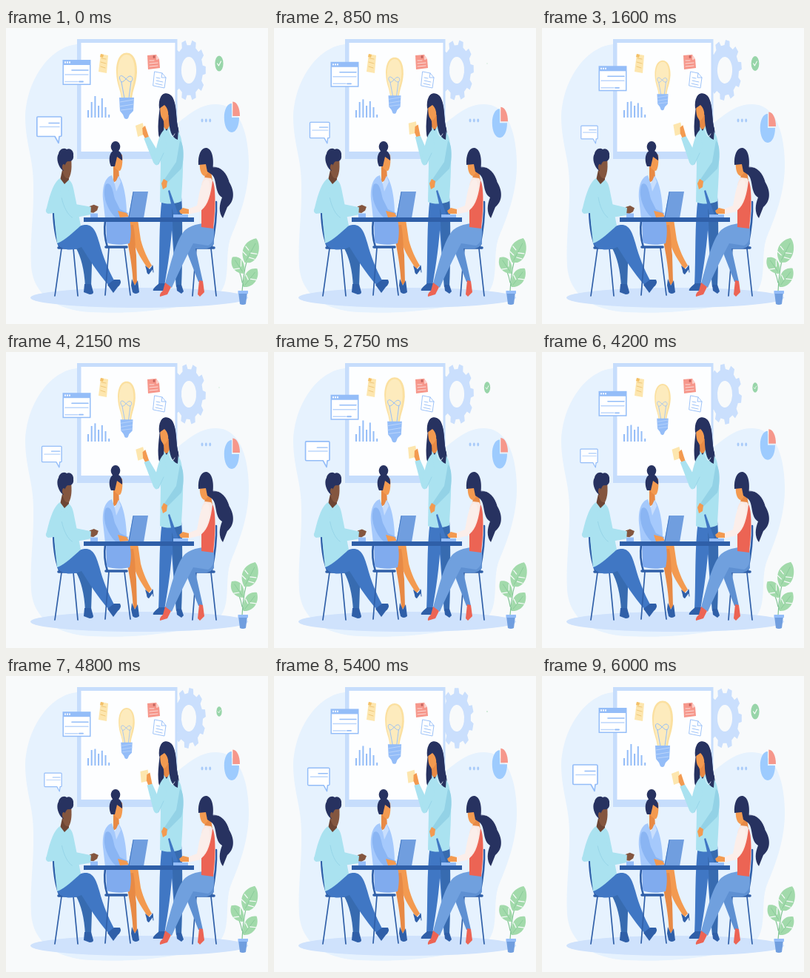
Animation of 354x400 px, one loop 6100 ms. Source, as an HTML page with a canvas:

```html
<!DOCTYPE html>
<html lang="en">
<head>
<meta charset="utf-8">
<title>Team meeting</title>
<style>
html, body { margin: 0; width: 100%; height: 100%; overflow: hidden; background: #f8fafb; }
canvas { display: block; width: 354px; height: 400px; }
</style>
</head>
<body>
<canvas id="stage" width="354" height="400"></canvas>
<script>
const ctx = document.getElementById('stage').getContext('2d');
const LOOP = 6100, STEP = 50;
const C = {
  bg: '#f8fafb', blob: '#e6f2fe', floor: '#cfe2fc', frame: '#c6ddfc', white: '#fdfeff',
  gear: '#cadffd', sky: '#bcd6fb', mid: '#94bdf8', blue: '#709edf', denim: '#4077c4',
  deep: '#2f5fa8', shade: '#376bb0', navy: '#273260', skin: '#f39a50', skinDark: '#e88a45',
  brown: '#84563f', mint: '#aae2f0', mintDark: '#93d2e6', dress: '#a5c9fc', dressDark: '#8ab5f3',
  skirt: '#80abee', jeans: '#70a0de', red: '#ec6454', salmon: '#f6978b', pie: '#9dcbfe',
  green: '#a2daab', leafDark: '#80c493', glass: '#fdebbd', note: '#fde6ae'
};

// Eased pulse: 0 at the start of each period, 1 halfway
const pulse = (t, period) => (1 - Math.cos(2 * Math.PI * t / period)) / 2;

function fill(d, color) {
  ctx.fillStyle = color;
  ctx.fill(new Path2D(d));
}
function line(d, color, width) {
  ctx.strokeStyle = color;
  ctx.lineWidth = width;
  ctx.stroke(new Path2D(d));
}
function rect(x, y, w, h, color) {
  ctx.fillStyle = color;
  ctx.fillRect(x, y, w, h);
}
function oval(x, y, rx, ry, color) {
  ctx.fillStyle = color;
  ctx.beginPath();
  ctx.ellipse(x, y, rx, ry, 0, 0, 7);
  ctx.fill();
}
function pose(x, y, { dy = 0, scale = 1, angle = 0 }, draw) {
  ctx.save();
  ctx.translate(x, y + dy);
  ctx.rotate(angle);
  ctx.scale(scale, scale);
  ctx.translate(-x, -y);
  draw();
  ctx.restore();
}

function backdrop() {
  rect(0, 0, 354, 400, C.bg);
  fill('M96 22C60 25 27 70 26 122C27 160 37 176 37 212C38 252 32 282 34 322C37 362 70 382 115 384C185 388 252 376 285 362C306 345 294 308 304 282C316 253 329 220 328 180C327 138 314 103 284 103C262 103 248 116 230 130L228 60Z', C.blob);
  oval(180, 364.5, 147, 13.5, C.floor);
}

function board() {
  rect(96, 15, 135.5, 162, C.frame);
  rect(101.5, 20, 127, 147, C.white);
}

function bars(t) {
  const tops = [111, 100, 92, 105, 95, 107, 117];
  const short = 1 - 0.25 * pulse(t, 3000);
  tops.forEach((top, i) => {
    const h = (121 - top) * (i === 2 || i === 4 ? short : 1);
    rect(110 + i * 4.7, 121 - h, 2, h, C.mid);
  });
}

function papers() {
  fill('M128 35L138 37L136 61L125 59Z', C.note);
  line('M129 41L135 42M128 46L135 48M128 52L134 54', '#eec373', 0.9);
  fill('M128 35L132 36L131 40L127 39Z', '#f3c069');
  fill('M191 37L203 36L207 42L208 54L192 56Z', C.salmon);
  fill('M203 36L207 42L203 43Z', '#fbd0ca');
  oval(200, 39, 1.5, 2, '#c4645f');
  line('M194 44H200M194 48L205 47M194 52L205 51', '#fde4e0', 0.9);
  fill('M201 59L211 61L216 67L214 81L199 78Z', '#fff');
  line('M201 59L211 61L216 67L214 81L199 78ZM211 61L210 67L216 67', C.mid, 0.9);
  line('M203 67L208 68M203 71L212 73M202 75L211 77', C.mid, 0.9);
}

function bulb(t) {
  pose(163, 75, { scale: 1 - 0.25 * pulse(t, 3000) }, () => {
    fill('M163 33.5C173 33.5 177.5 46 177 60C176 77 171 83 170 96H156C155 83 149.5 77 149 60C148.5 46 153 33.5 163 33.5Z', '#fbe0a0');
    fill('M163 36C171 36 174 47 174 59C173 76 169 82 168 96H157C156 83 151 76 151 60C151 47 155 36 163 36Z', C.glass);
    line('M160 95L156 73C151 67 154 61 160 67L166 72C171 75 173 66 168 65C163 65 161 73 156 73M166 95L169 72', C.mid, 1);
    fill('M153 94H173L172 112L167 117L165 122Q163 124 160 122L158 117L154 112Z', C.mid);
    line('M154 100L172 97M154 106L172 103M155 111L171 109', C.sky, 1);
  });
}

function gear(t) {
  ctx.save();
  ctx.translate(247, 57);
  ctx.scale(0.56, 1);
  ctx.rotate(pulse(t, 6000) * Math.PI);
  ctx.beginPath();
  for (let i = 0; i < 10; i++) {
    const a = i * Math.PI / 5;
    [[-0.19, 34], [-0.12, 41], [0.12, 41], [0.19, 34]].forEach(([o, r]) =>
      ctx.lineTo(r * Math.cos(a + o), r * Math.sin(a + o)));
  }
  ctx.closePath();
  ctx.moveTo(18, 0);
  ctx.arc(0, 0, 18, 0, 2 * Math.PI, true);
  ctx.fillStyle = C.gear;
  ctx.fill('evenodd');
  ctx.restore();
}

function browser(t) {
  pose(95, 60, { dy: 15 * pulse(t, 6000) }, () => {
    rect(76.5, 43, 38, 34, C.mid);
    rect(78, 50, 35, 25.5, '#fff');
    for (let i = 0; i < 3; i++) oval(80 + i * 3, 46.5, 0.9, 1.4, '#fff');
    line('M89 57H111', C.mid, 1.6);
    line('M80 63H111', C.sky, 1.6);
    line('M80 72.5H97', C.sky, 1.6);
    line('M99 72.5H104', C.mid, 1.8);
  });
}

function bubble(t) {
  pose(75.5, 157, { scale: 1 - 0.33 * pulse(t, 3000) }, () => {
    const d = 'M43 120H73.5Q75 120 75 121.5V145Q75 146.5 73.5 146.5H72L71 155.5L66 146.5H43Q41.8 146.5 41.8 145V121.5Q41.8 120 43 120Z';
    fill(d, '#fff');
    line(d, C.mid, 1.7);
    line('M58 128.5H72', C.mid, 1.5);
    line('M46 133.5H72', C.sky, 1.7);
  });
}

function badge(t) {
  pose(288, 48, { scale: Math.max(0.06, 1 - pulse(t, 1500)) }, () => {
    oval(288, 48, 5.6, 10.5, '#98d5a9');
    line('M285.5 48L287.4 51L290.5 45', '#fff', 1.1);
  });
}

function pie(t) {
  pose(305, 121, { dy: 19 * pulse(t + 600, 6000) - 1.8 }, () => {
    fill('M305 121V102C299 102 294.8 110 294.8 121C294.8 132 299 141 305 141C311 141 315 132 315 121Z', C.pie);
    fill('M306.3 119V99.5C312 99.5 316 108 316 119Z', C.salmon);
  });
  [265, 270.3, 275.7].forEach(x => oval(x, 125, 1.5, 2.4, '#a9cbf9'));
}

function chair(back, seat, legs) {
  line(back, C.deep, 2.6);
  line(seat, C.deep, 3.6);
  line(legs, C.deep, 1.7);
}

function man(t) {
  chair('M64 241C64 262 67 282 72 295', 'M71 297H98', 'M75 298L66 362M91 298L97 362');
  fill('M86 284C98 276 112 280 117 290L115 350H107C106 326 101 309 95 298Z', C.shade);
  fill('M69 291C82 283 92 268 106 266C118 265 122 276 126 290C131 309 138 326 146 341L139 348C123 330 112 312 102 296C91 301 76 302 69 291Z', C.denim);
  fill('M106 346L115 346L118 357Q118 360 113 360L105 357Z', C.deep);
  fill('M137 347L146 340L154 340Q157 345 151 350L145 358Z', C.deep);
  fill('M76 192L85 197L85 209L79 213L73 206Z', '#6d4534');
  fill('M76 176H88C89 185 89 196 85 203C80 205 77 198 76 190Z', C.brown);
  fill('M75 191C69 184 68 174 71 170C72 164 78 161 82 164C87 161 92 167 91 172C92 178 88 181 84 180C80 181 81 185 78 187L78 193Z', C.navy);
  oval(78, 188, 2, 4, C.brown);
  fill('M73 203C65 208 60 222 55 243Q52 249 57 251L65 250C66 266 68 280 69 291C80 287 92 275 101 267L94 231C91 217 91 210 85 205L79 211Z', C.mint);
  pose(92, 245, { angle: -0.05 + 0.06 * pulse(t, 1000) }, () => {
    fill('M113 242L119 240L125 243L123 248L118 251L112 250Z', C.brown);
    fill('M75 215C82 211 88 219 90 230L94 238L115 243L114 253L88 257C80 251 73 231 75 215Z', C.mint);
    line('M76 229C78 241 83 252 89 256', C.mintDark, 0.8);
  });
}

function seatedWoman() {
  chair('M134 261C132 274 134 286 137 296', 'M135 296H163', 'M139 297L134 361M160 297L168 361');
  fill('M162 259H178L182 286C186 301 191 311 197 321L192 326C184 313 176 303 172 287Z', C.skin);
  fill('M160 267L172 266C175 282 174 291 176 307L177 344L172 349C171 325 168 310 165 293Z', C.skinDark);
  line('M198 321L199 330', C.deep, 1);
  fill('M188 321L194 326L198 321L199 325L193 333Q190 332 190 328Z', C.deep);
  fill('M170 339L174 348L178 341L180 357Q175 361 171 357L169 348Z', C.deep);
  fill('M135 255H166C170 269 169 281 167 291C156 294 144 293 136 290Z', C.skirt);
  oval(148, 160.5, 6.3, 7.5, C.navy);
  fill('M145 184H152L153 204L145 209Z', C.skinDark);
  fill('M146 171H157C158 180 157 190 154 193C149 193 146 188 145 182Z', C.skin);
  fill('M142 187C137 176 141 165 148 165C154 165 158 171 157 179L150 174L147 187Z', C.navy);
  fill('M143 199C133 202 130 216 131 231L134 258H163C164 239 160 208 152 200L147 211Z', C.dress);
  fill('M145 201L147 211L152 200L155 208L149 221Z', '#c8defd');
  fill('M135 211C142 207 144 218 147 231L154 245L165 250L164 256H148C136 245 129 223 135 211Z', C.dressDark);
  fill('M151 247L163 250L166 255L154 256Z', C.skin);
  fill('M172 221H192L186 257H165Z', C.blue);
  line('M172 221.5L166 256', C.denim, 1);
}

function presenter(t) {
  fill('M211 228H237C239 264 238 314 237 350H230L224 273C222 302 217 331 214 349H206C208 308 206 266 211 228Z', C.denim);
  fill('M224 246L229 230H237C239 264 238 314 237 350H230Z', C.shade);
  fill('M207 345L215 345L221 347L212 355H199Q197 353 207 345Z', C.deep);
  fill('M230 347H237L240 356L237 359L231 355Z', C.deep);
  fill('M209 96C209 87 220 86 225 94C231 105 229 123 233 137C235 146 232 154 226 155L208 151C203 137 207 117 209 96Z', C.navy);
  fill('M213 117H222L224 135L211 138Z', C.skinDark);
  fill('M209 100H221C221 112 219 122 214 125C209 123 207 113 209 100Z', C.skin);
  fill('M212 132C205 139 208 165 209 184L208 235C217 239 230 238 237 234C238 211 242 166 236 147C233 138 226 131 221 132L217 139Z', C.mint);
  fill('M207 109C205 90 215 84 224 92C232 104 229 124 233 136L232 151C223 148 221 137 220 125C220 116 219 108 214 104Z', C.navy);
  fill('M210 121C205 129 205 142 208 150C213 147 214 136 213 126Z', C.navy);
  line('M220 137Q224 153 228 143', '#e8f4fb', 0.8);
  fill('M235 152C241 157 241 179 237 190L217 210L213 206L230 181Z', C.mintDark);
  fill('M213 204L218 207L217 215L212 218L210 210Z', C.skin);
  // Upper arm stays, forearm lifts the note
  pose(203, 182, { angle: -0.08 + 0.14 * pulse(t, 2000) }, () => {
    fill('M179 130L189 127L192 142L181 145Z', C.note);
    fill('M188 134L192 131L196 147L191 149L188 142Z', C.skin);
    fill('M189 148L196 146L209 172L206 184Q202 188 199 181Z', C.mint);
  });
  fill('M213 138C206 145 204 159 200 176Q200 187 206 184L217 160Z', C.mint);
  line('M206 184L213 169', C.mintDark, 0.8);
}

function rightWoman() {
  chair('M284 235C285 260 281 280 278 295', 'M254 297H281', 'M257 298L252 362M277 298L284 362');
  fill('M262 270L280 270L281 292C275 300 264 299 256 298L266 343H260L241 294Z', '#5e90d2');
  fill('M279 262C283 276 282 290 273 294L253 291C242 312 232 333 224 351L215 345C223 317 230 285 242 273C253 264 268 264 279 262Z', C.jeans);
  fill('M215 344L223 350L218 360L208 363Q207 359 212 355Z', C.red);
  fill('M261 341L266 342L268 357L262 363L259 360Z', C.red);
  fill('M276 188C288 185 298 194 302 209C309 221 309 234 299 242L293 257C287 249 288 239 292 229C281 222 286 205 278 198Z', C.navy);
  line('M280 188C292 186 300 197 302 208', '#dfe6f4', 0.6);
  fill('M268 193H277L279 207L269 209Z', C.skinDark);
  fill('M262 180H274C277 187 274 198 268 200C263 198 261 190 262 180Z', C.skin);
  fill('M260 185C259 171 264 161 271 162C280 164 282 181 278 198L272 194L270 184Z', C.navy);
  fill('M269 202C261 209 264 226 265 243L279 264C285 248 284 212 277 203Z', '#fae9e3');
  fill('M279 206C284 214 283 246 280 271L264 269L264 246C273 240 277 224 279 206Z', C.red);
  fill('M271 204C278 207 276 223 271 235L263 248L246 252L245 245L258 240C261 229 261 211 271 204Z', '#fbeeea');
  fill('M247 245L239 243L234 247L236 251L247 251Z', C.skin);
}

function table() {
  fill('M219 220L221 219L234 255H227Z', C.denim);
  rect(226, 252, 20, 4, C.mid);
  rect(114, 250.5, 10, 5.5, C.mid);
  rect(105, 256, 149, 6, C.deep);
}

function plant(t) {
  pose(319, 356, { angle: 0.015 * (1 - 2 * pulse(t, 3000)) }, () => {
    line('M319 356C320 335 324 313 330 296M319 344C317 332 314 325 309 319M320 349C322 339 326 334 334 329', C.leafDark, 1.2);
    fill('M322 317C315 304 319 288 337 284C344 292 342 313 329 317Z', C.green);
    fill('M305 310C317 307 324 318 321 332C309 332 301 322 305 310Z', C.green);
    fill('M321 350C319 335 326 323 339 325C343 337 335 351 321 350Z', C.green);
    line('M324 314L336 291M319 329L309 314M323 347L336 330', C.leafDark, 0.7);
    line('M324 307L319 302M327 300L323 295M330 304L338 305M328 310L335 312M315 325L308 326M317 322L317 314M327 340L324 334M330 339L338 340', C.bg, 1.2);
  });
  fill('M314 357H326L324 373Q320 375 316 373Z', C.blue);
  rect(313.5, 355, 13.5, 4, C.mid);
}

function draw(now) {
  const t = Math.min(Math.floor((now % LOOP) / STEP) * STEP, 6000);
  ctx.lineCap = 'round';
  ctx.lineJoin = 'round';
  backdrop();
  gear(t);
  board();
  bars(t);
  papers();
  bulb(t);
  browser(t);
  bubble(t);
  badge(t);
  pie(t);
  presenter(t);
  man(t);
  seatedWoman();
  rightWoman();
  table();
  plant(t);
}

const start = performance.now();
function tick() {
  draw(performance.now() - start);
  requestAnimationFrame(tick);
}
tick();
</script>
</body>
</html>
```
